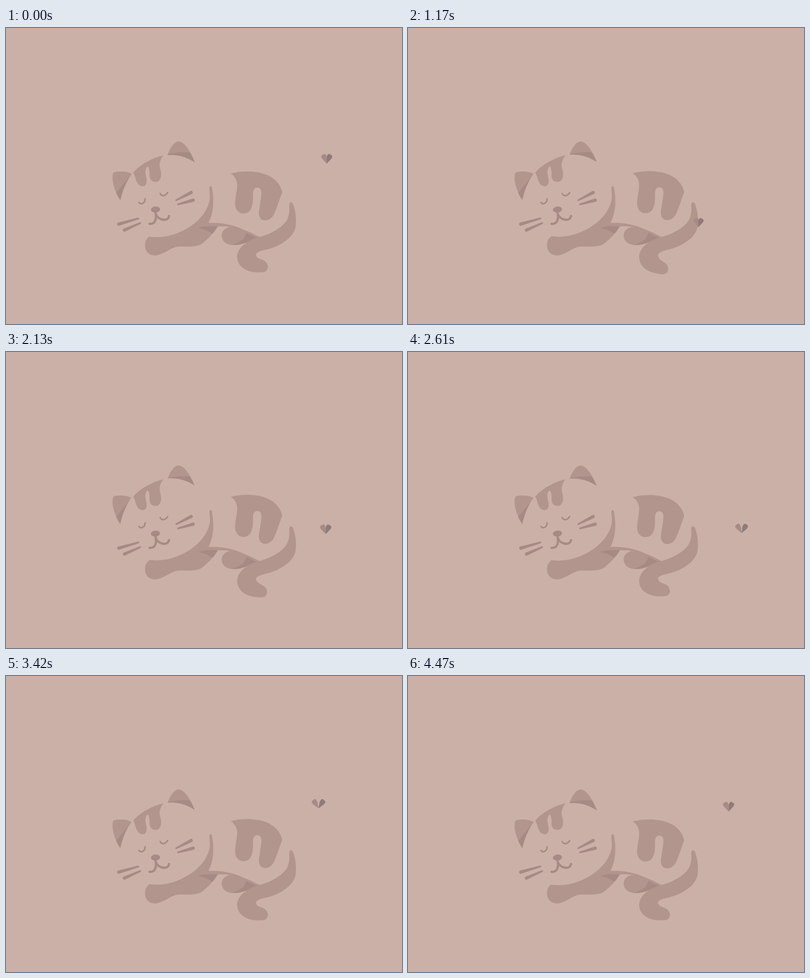
These frames come from a looping animation (800x600 px, 4.5 s). An HTML page:

```html
<!DOCTYPE html>
<html lang="en">
<head>
<meta charset="utf-8">
<title>Sleeping cat</title>
<style>
html, body { margin: 0; width: 100%; height: 100%; overflow: hidden; background: #cab0a7; }
svg { display: block; width: 100vw; height: 100vh; }
.bg { fill: #cab0a7; }
.fur { fill: #b2958c; }
.dark { fill: #a78a84; }
.line { fill: none; stroke: #a78a84; stroke-linecap: round; stroke-linejoin: round; }
</style>
</head>
<body>
<svg viewBox="0 0 800 600">
  <rect class="bg" width="800" height="600"/>

  <!-- ears -->
  <path class="fur" d="M231 349C220 332 213 312 216 296C217 291 222 291 236 291Q248 292 254 296L262 304L236 345Z"/>
  <path class="dark" d="M222.5 334L254 295.5L262 304L236 345L231 349Q226 342 222.5 334Z"/>
  <path class="fur" d="M326 258C331 245 338 231 348 230C362 230 375 255 382 274L372 276L330 266Z"/>
  <path class="dark" d="M328 255Q350 251 371.5 252C376 259 379 266 382 274L372 276L326 264Z"/>

  <!-- front leg, chest and belly line -->
  <path class="fur" d="M411 323C412 319 415 319.5 416 323C420 345 421 372 409 395C440 394 464 400 487 412L513 424L500 425C480 409 460 401 428 402C421 413 412 424 402 432C390 445 375 443 348 443C332 445 317 460 302 461C285 461 280 448 281 438C281 430 286 425 290 422L320 412L400 370Z"/>
  <path class="dark" d="M388 405C400 401 415 401 428 402Q423 411 417 417C408 411 398 407 388 405Z"/>
  <path class="fur" d="M452 403.5C440 406 434 415 436 424C438 434 447 440 460 440C480 440 495 431 512 425C495 413 475 406 452 403.5Z"/>
  <path class="dark" d="M457 439.5C468 435 479 431 481 425L486 415.5L507 425.5Q490 433 473 438.5Q465 440.5 457 439.5Z"/>

  <path id="head" class="bg" d="M231 350C235 330 244 309 254 296C275 268 300 258 326 258C346 256 366 262 382 273C402 289 412 312 412 345C406 394 340 431 290 423C262 420 238 400 231 350Z"/>

  <!-- face -->
  <path class="fur" d="M257 293C272 276 294 264 318 258C312 266 309 274 311 283C313 291 314 296 313 302C311 309 307 312 302 312C293 312 290 305 290 298C290 291 290 283 286 280.5C282 283 281 290 282 297C284 306 286 314 281 319C277 322 270 321 266 315C261 308 262 301 257 293Z"/>
  <path class="line" stroke-width="3" d="M268.5 353.500Q271 357.500 276 355.500Q281 353 281 346M311.500 335.500Q314 341 320 339.500Q325 337 326.500 333.500"/>
  <ellipse class="dark" cx="302" cy="368" rx="9.300" ry="6" transform="rotate(-7 302 368)"/>
  <path class="line" stroke-width="4.6" d="M302 374C305 386 302 398 290 397M302 376C308 391 327 393 329.500 381"/>
  <path id="whiskers" class="dark"/>

  <path id="stripe" class="fur" d="M454 295C475 289 505 289 525 297C543 303.500 555 317.500 558 333C553 346 548 362 543 374C539 384 532 390 524 390C515 390 510 383 511 373C512 361 516 345 516 334C516 327 513 323.500 508 323.500C501 323.500 499 329 499 336C499 348 499 356 496 364C493 372 488 376 480 376C470 376 464 369 463 359C462 345 467 333 467 319C467 308 462 300 454 295Z"/>
  <path id="tail" class="fur"/>

  <g id="butterfly">
    <path id="wingL" fill="#a68b86"/>
    <path id="wingR" fill="#907b79"/>
  </g>
</svg>
<script>
const LOOP = 4500, STEP = 30;
const el = id => document.getElementById(id);
const set = (id, name, value) => el(id).setAttribute(name, value);
const wave = (t, period) => (1 - Math.cos(2 * Math.PI * t / period)) / 2;
const ramp = (t, a, b) => {
  const u = Math.min(1, Math.max(0, (t - a) / (b - a)));
  return u * u * (3 - 2 * u);
};

// Tapered bar from a thick round end to a thin one
function whisker(x1, y1, x2, y2, r1 = 3.4, r2 = 1.8) {
  const d = Math.hypot(x2 - x1, y2 - y1);
  const nx = (y1 - y2) / d, ny = (x2 - x1) / d;
  return `M${x1 + nx * r1} ${y1 + ny * r1}` +
    `A${r1} ${r1} 0 0 1 ${x1 - nx * r1} ${y1 - ny * r1}` +
    `L${x2 - nx * r2} ${y2 - ny * r2}` +
    `A${r2} ${r2} 0 0 1 ${x2 + nx * r2} ${y2 + ny * r2}Z`;
}
set("whiskers", "d",
  whisker(228, 397.5, 267.5, 386) + whisker(239.5, 409.5, 271, 395.5) +
  whisker(374, 333.5, 344, 349) + whisker(378, 349, 347.5, 357.5));

const WING = "M0 0L-4.5 -12Q-6 -20 -1.500 -20.300Q4.500 -19.800 5.300 -18Q6.300 -15 5 -12Z";
set("wingL", "d", WING);
set("wingR", "d", WING);

// Turning points of the flight; a repeated place is a rest
const stops = [
  { t: 0, x: 648, y: 265 },
  { t: 300, x: 615, y: 306 },
  { t: 660, x: 584, y: 394 },
  { t: 1100, x: 584, y: 394 },
  { t: 1590, x: 634, y: 394 },
  { t: 2160, x: 647, y: 358 },
  { t: 2610, x: 674, y: 357 },
  { t: 2880, x: 710, y: 304 },
  { t: 3240, x: 669, y: 246 },
  { t: 3690, x: 575, y: 287 },
  { t: 3810, x: 567.5, y: 276 },
  { t: 4080, x: 590, y: 238 },
  { t: 4320, x: 636, y: 257 },
  { t: LOOP, x: 648, y: 265 }
];

const rate = (a, b, axis) => (b[axis] - a[axis]) / (b.t - a.t);

function slope(i, axis) {
  if (i === 0 || i === stops.length - 1) return 0;
  const before = rate(stops[i - 1], stops[i], axis);
  const after = rate(stops[i], stops[i + 1], axis);
  return before && after ? (before + after) / 2 : 0;
}

function place(t, axis) {
  const i = stops.findIndex(s => s.t > t) - 1;
  const a = stops[i], b = stops[i + 1], d = b.t - a.t;
  const u = (t - a.t) / d, v = 1 - u;
  return a[axis] * v * v * (1 + 2 * u) + b[axis] * u * u * (1 + 2 * v) +
    d * u * v * (slope(i, axis) * v - slope(i + 1, axis) * u);
}

// The curled end of the tail turns about its bend
function tailPath(angle) {
  const p = (x, y, weight = 1) => {
    const a = angle * weight * Math.PI / 180, dx = x - 487, dy = y - 464;
    return `${(487 + dx * Math.cos(a) - dy * Math.sin(a)).toFixed(2)} ` +
      `${(464 + dx * Math.sin(a) + dy * Math.cos(a)).toFixed(2)} `;
  };
  return "M572 358C573 352 578 352 580 357C585 370 587 388 585 403C581 425 555 440 537 446" +
    `C525 450 ${p(506, 452, .2)}${p(505, 459, .4)}` +
    `C${p(505, 467, .7)}${p(515, 468)}${p(522, 472)}` +
    `C${p(530, 477)}${p(531, 487)}${p(526, 492)}` +
    `C${p(522, 496)}${p(512, 495.5)}${p(502, 495, .8)}` +
    `C${p(482, 493, .4)}467 481 467 464C468 446 482 436 500 427L511 424` +
    "C535 418 562 403 569 386C573 376 573 367 572 358Z";
}

function draw(t) {
  const breath = wave(t, 1500);
  const lift = breath + .7 * Math.sin(Math.PI * t / LOOP);
  set("head", "transform", `translate(0 ${-lift})`);
  set("stripe", "transform", `translate(0 ${-1.4 * breath})`);

  const wag = t > 1090 && t < 2590 ? 18 * Math.sin(Math.PI * (t - 1090) / 500) : 0;
  set("tail", "d", tailPath(wag));

  const rest = ramp(t, 570, 690) * (1 - ramp(t, 1080, 1240));
  const open = wave(t, 300);
  const spread = (20 + 12 * open) * (1 - rest) + (11 + 2 * open) * rest;
  const tilt = 10 * rest + 10 * ramp(t, 3500, 3800) * (1 - ramp(t, 3850, 4300));
  const size = 1 - .1 * rest;
  set("butterfly", "transform",
    `translate(${place(t, "x")} ${place(t, "y") + 10}) rotate(${tilt}) scale(${size})`);
  set("wingL", "transform", `scale(-1 1) rotate(${spread})`);
  set("wingR", "transform", `rotate(${spread})`);
}

const start = performance.now();
function tick() {
  const t = Math.max(0, performance.now() - start) % LOOP;
  draw(Math.floor(t / STEP) * STEP);
  requestAnimationFrame(tick);
}
draw(0);
requestAnimationFrame(tick);
</script>
</body>
</html>
```
